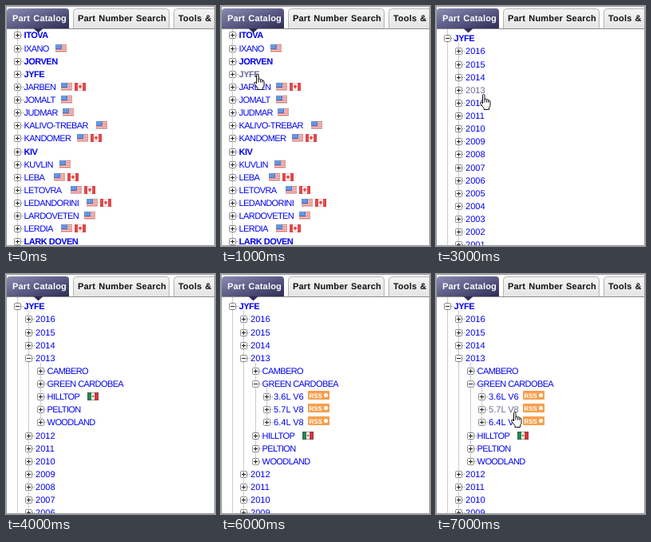
An HTML page for the animation above (8 s loop, 262x300 px).

```html
<!DOCTYPE html>
<html lang="en">
<head>
<meta charset="utf-8">
<title>Part Catalog</title>
<style>
html, body { margin: 0; width: 100%; height: 100%; overflow: hidden; background: #fff; }
svg { display: block; width: 100vw; height: 100vh; }
text { font: 11px "Liberation Sans", Arial, sans-serif; text-rendering: geometricPrecision; white-space: pre; }
.b { font-weight: bold; }
.node { fill: #0000ee; letter-spacing: -.6px; }
.node.b { letter-spacing: -.5px; }
.node.num { letter-spacing: 0; }
.node.hot { fill: #6a6a98; }
.tab { font-weight: bold; letter-spacing: .2px; word-spacing: .8px; }
.rss { font-size: 8px; font-weight: bold; fill: #fff; }
.dots { stroke: #999; stroke-dasharray: 1 1; fill: none; }
</style>
</head>
<body>
<svg viewBox="0 0 262 300">
  <defs>
    <linearGradient id="dark" x2="1" y2="1">
      <stop offset="0" stop-color="#8c8cb2"/><stop offset=".5" stop-color="#5c5c86"/><stop offset="1" stop-color="#2c2c54"/>
    </linearGradient>
    <linearGradient id="light" x2="0" y2="1">
      <stop offset="0" stop-color="#f4f4f4"/><stop offset="1" stop-color="#e4e4e4"/>
    </linearGradient>
    <g id="us">
      <path fill="#fae4e2" d="M0 0h14v10H0z"/>
      <path stroke="#e4706c" d="M0 .5h14M0 2.5h14M0 4.5h14M0 6.5h14M0 8.5h14"/>
      <path fill="#4f86dc" d="M0 0h8v6H0z"/>
      <path stroke="#a9c8f4" stroke-dasharray="1 1" d="M1 1.5h6M1 3.5h6"/>
      <path fill="none" stroke="#888" stroke-opacity=".25" d="M.5 .5h13v9H.5z"/>
    </g>
    <g id="ca">
      <path fill="#fff" d="M0 0h14v10H0z"/>
      <path fill="#e6484a" d="M0 0h4v10H0zM10 0h4v10h-4zM7 2l1 1.5 1.5.5L8 6.500H7.300V8h-.6V6.500H6L4.500 4 6 3.500z"/>
      <path fill="none" stroke="#944" stroke-opacity=".25" d="M.5 .5h13v9H.5z"/>
    </g>
    <g id="mx">
      <path fill="#fff" d="M0 0h14v10H0z"/>
      <path fill="#23864f" d="M0 0h5v10H0z"/><path fill="#d8343c" d="M9 0h5v10H9z"/>
      <circle cx="7" cy="5" r="1.400" fill="#9a8a58"/>
      <path fill="none" stroke="#444" stroke-opacity=".5" d="M.5 .5h13v9H.5z"/>
    </g>
    <g id="rss">
      <rect width="27" height="11" rx="1" fill="#f89f4c"/>
      <text class="rss" x="1.500" y="8.500">RSS</text>
      <circle cx="22.500" cy="5.500" r="2.500" fill="#fff"/>
    </g>
    <path id="hand" fill="#fff" stroke="#111" stroke-linejoin="round"
      d="M3.500 12V1.800Q3.500.5 4.700.5T6 1.800V7Q6.300 6 7.300 6T8.500 7.500Q8.800 6.600 9.800 6.700T10.800 8.200Q13 7.600 13 9.500V14Q13 16 11.500 17V19.500H5V17.500L1 12.500Q0 10.800 1.200 10.200T3.500 12zM8.500 7.500V10.500M10.800 8.200V10.800M6 7V10.500"/>
    <clipPath id="stage"><path d="M1 1h260v298H1z"/></clipPath>
  </defs>
  <path fill="#fff" d="M0 0h262v300H0z"/>
  <g clip-path="url(#stage)">
    <g id="tree"></g>
    <path fill="#fff" d="M1 1h260v27H1z"/>
    <path fill="url(#light)" stroke="#b4b4b4" d="M84.500 28.500V7.500q0-4 4-4h112q4 0 4 4v21M210.500 28.500V7.500q0-4 4-4H264v25"/>
    <path stroke="#8c8c8c" d="M1 28.500h260"/>
    <path fill="url(#dark)" d="M1 28V7q0-4 4-4h70q4 0 4 4v21z"/>
    <path fill="#2c2c54" d="M34.500 28h12l-6 5.500z"/>
    <text class="tab" x="8" y="19" fill="#fff">Part Catalog</text>
    <text class="tab" x="90" y="19" fill="#111">Part Number Search</text>
    <text class="tab" x="216" y="19" fill="#111">Tools &amp; Utilities</text>
    <g id="cursor"><use href="#hand"/></g>
  </g>
  <path fill="none" stroke="#999" d="M.5 .5h261v299H.5z"/>
</svg>
<script>
const tree = document.getElementById('tree');
const cursor = document.getElementById('cursor');
const STEP = 1000, LOOP = 8000, PITCH = 16.125;

// name | flag x | flags; a leading * means bold
const makes = `*ITOVA,IXANO|62|us,*JORVEN,*JYFE,JARBEN|69|us ca,JOMALT|69|us,JUDMAR|71|us,
KALIVO-TREBAR|113|us,KANDOMER|89|us ca,*KIV,KUVLIN|67|us,LEBA|60|us ca,LETOVRA|81|us ca,
LEDANDORINI|101|us ca,LARDOVETEN|98|us,LERDIA|69|us ca,*LARK DOVEN`.split(',').map(s => {
  const [name, x, marks] = s.trim().split('|');
  return { depth: 0, name: name.replace('*', ''), bold: name[0] === '*', x: +x, marks };
});

const models = [
  { name: 'CAMBERO' }, { name: 'GREEN CARDOBEA' }, { name: 'HILLTOP', x: 102, marks: 'mx' },
  { name: 'PELTION' }, { name: 'WOODLAND' }
].map(m => ({ depth: 2, ...m }));
const engines = ['3.6L V6', '5.7L V8', '6.4L V8']
  .map(name => ({ depth: 3, name, num: true, x: 109, marks: 'rss' }));

function catalog(level) {
  const rows = [{ depth: 0, name: 'JYFE', bold: true, open: true }];
  for (let year = 2016; year > 1999; year--) {
    const open = year === 2013 && level > 0;
    rows.push({ depth: 1, name: String(year), num: true, open });
    if (!open) continue;
    for (const m of models) {
      const wide = level > 1 && m === models[1];
      rows.push({ ...m, open: wide });
      if (wide) rows.push(...engines);
    }
  }
  return rows;
}

const scenes = [
  { rows: makes },
  { rows: makes, hot: 'JYFE', at: [41, 85] },
  { rows: catalog(0), lit: '2013' },
  { rows: catalog(0), hot: '2013', at: [55, 110] },
  { rows: catalog(1) },
  { rows: catalog(1), hot: 'GREEN CARDOBEA', at: [132, 140] },
  { rows: catalog(2) },
  { rows: catalog(2), hot: '5.7L V8', at: [94, 172] }
];

const boxX = depth => 10 + Math.floor(depth * 14.5);

function drawRow(row, y, scene) {
  const x = boxX(row.depth), lit = row.name === scene.lit;
  const cls = ['node', row.bold && 'b', row.num && 'num', row.name === scene.hot && 'hot'].filter(Boolean).join(' ');
  let out = `<path class="dots" d="M${x + 9} ${y + .5}h4"/>
    <rect x="${x + .5}" y="${y - 3.5}" width="8" height="8" rx="1" fill="${lit ? '#d4e6ff' : '#fff'}" stroke="${lit ? '#5c8cc8' : '#8a8a8a'}"/>
    <path stroke="${lit ? '#1c50a0' : '#222'}" d="M${x + 2} ${y + .5}h5${row.open ? '' : 'm-2.5-2.5v5'}"/>
    <text class="${cls}" x="${22.6 + row.depth * 14.5}" y="${y + 4}">${row.name}</text>`;
  (row.marks || '').split(' ').filter(Boolean).forEach((mark, i) => {
    out += `<use href="#${mark}" x="${row.x + i * 17}" y="${y - (mark === 'rss' ? 7 : 5)}"/>`;
  });
  return out;
}

function draw(scene) {
  const top = scene.rows === makes ? 36.4 : 40.3;
  const ys = scene.rows.map((_, i) => Math.round(top + i * PITCH));
  const line = (depth, from, to) => `<path class="dots" d="M${boxX(depth) + 4.5} ${from}V${to}"/>`;
  let out = line(0, 29, 300);
  scene.rows.forEach((row, i) => {
    if (!row.open) return;
    let last = i;
    for (let j = i + 1; j < ys.length && scene.rows[j].depth > row.depth; j++)
      if (scene.rows[j].depth === row.depth + 1) last = j;
    out += line(row.depth + 1, ys[i] + 6, ys[last]);
  });
  tree.innerHTML = out + scene.rows.map((row, i) => drawRow(row, ys[i], scene)).join('');
  cursor.style.display = scene.at ? '' : 'none';
  if (scene.at) cursor.setAttribute('transform', `translate(${scene.at})`);
}

let shown = -1;
const start = performance.now();
function tick() {
  const n = Math.floor((performance.now() - start) % LOOP / STEP);
  if (n !== shown) draw(scenes[shown = n]);
  requestAnimationFrame(tick);
}
tick();
</script>
</body>
</html>
```
